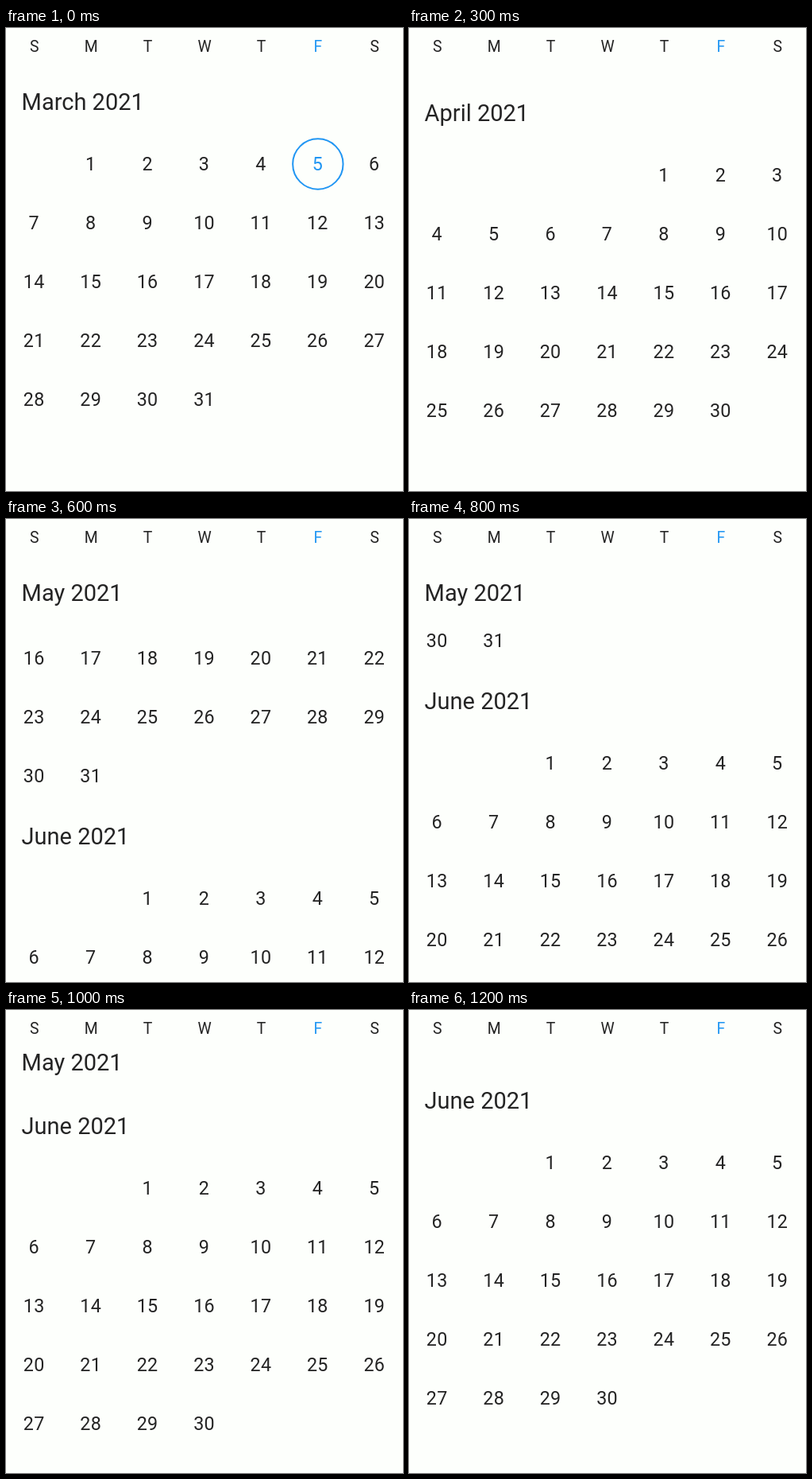
Recreate the animation shown at these times as an HTML page with a canvas. Size 500 by 582 pixels, loop 1.3 s.

```html
<!DOCTYPE html>
<html lang="en">
<head>
<meta charset="utf-8">
<title>Scrolling calendar</title>
<style>
  html, body { margin: 0; width: 100%; height: 100%; overflow: hidden; background: #fdfffc; }
  canvas { display: block; }
</style>
</head>
<body>
<canvas id="stage" width="500" height="582"></canvas>
<script>
const ctx = document.getElementById('stage').getContext('2d');
const PAPER = '#fdfffc', INK = '#242424', BLUE = '#2196f3';
const LOOP = 1300, STEP = 100;
const COL = 500 / 7, ROW = 74, HEAD = 80, MONTH = HEAD + 6 * ROW;
const BAR = 54, PIN = 93;
const YEAR = 2021, FIRST = 2;
const NAMES = ['March', 'April', 'May', 'June'];

// Scroll keys: time in ms, offset in px
const KEYS = [[0, 0], [300, 510], [500, 1030], [600, 1266], [800, 1436], [1000, 1519], [1200, 1551]];

function slope(i) {
  const a = KEYS[Math.max(i - 1, 0)], b = KEYS[Math.min(i + 1, KEYS.length - 1)];
  return (b[1] - a[1]) / (b[0] - a[0]);
}

// Cubic Hermite curve through the keys
function scrollAt(t) {
  let i = 0;
  while (i < KEYS.length - 2 && t >= KEYS[i + 1][0]) i++;
  const [t0, y0] = KEYS[i], [t1, y1] = KEYS[i + 1];
  const d = t1 - t0, u = (t - t0) / d, v = 1 - u;
  return Math.round(v * v * (1 + 2 * u) * y0 + u * u * (3 - 2 * u) * y1
    + d * u * v * (v * slope(i) - u * slope(i + 1)));
}

function label(str, x, middle, size, spacing, color = INK, align = 'center') {
  ctx.font = `${size}px Roboto, sans-serif`;
  ctx.letterSpacing = spacing + 'px';
  ctx.textAlign = align;
  ctx.fillStyle = color;
  ctx.fillText(str, x, middle + size * 0.3555);
}

function cover(y, height) {
  ctx.fillStyle = PAPER;
  ctx.fillRect(0, y, 500, height);
}

function drawDays(m, top) {
  const start = new Date(YEAR, m, 1).getDay();
  const count = new Date(YEAR, m + 1, 0).getDate();
  for (let day = 1; day <= count; day++) {
    const cell = start + day - 1;
    const x = (cell % 7 + 0.5) * COL;
    const y = top + 78 + Math.floor(cell / 7) * ROW;
    const today = m === 2 && day === 5;
    label(day, x - 0.5, y - 0.5, 23.3, 0.25, today ? BLUE : INK);
    if (today) {
      ctx.strokeStyle = BLUE;
      ctx.lineWidth = 2;
      ctx.beginPath();
      ctx.arc(x, y, 31.7, 0, Math.PI * 2);
      ctx.stroke();
    }
  }
}

// Month titles stick below the weekday bar until the next one pushes them out
function drawTitle(name, top) {
  const y = Math.max(top, Math.min(PIN, top + MONTH - HEAD));
  cover(y - 39, HEAD);
  label(`${name} ${YEAR}`, 19.6, y, 29, 0, INK, 'left');
}

function draw(t) {
  const scroll = scrollAt(t);
  const topOf = i => PIN + i * MONTH - scroll;
  cover(0, 582);
  NAMES.forEach((_, i) => drawDays(FIRST + i, topOf(i)));
  NAMES.forEach((name, i) => drawTitle(name, topOf(i)));
  cover(0, BAR);
  [...'SMTWTFS'].forEach((c, i) => label(c, (i + 0.5) * COL, 23.2, 19.4, 0, i === 5 ? BLUE : INK));
}

const begin = performance.now();
function tick() {
  const t = (performance.now() - begin) % LOOP;
  draw(Math.floor(t / STEP) * STEP);
  requestAnimationFrame(tick);
}
tick();
</script>
</body>
</html>
```
